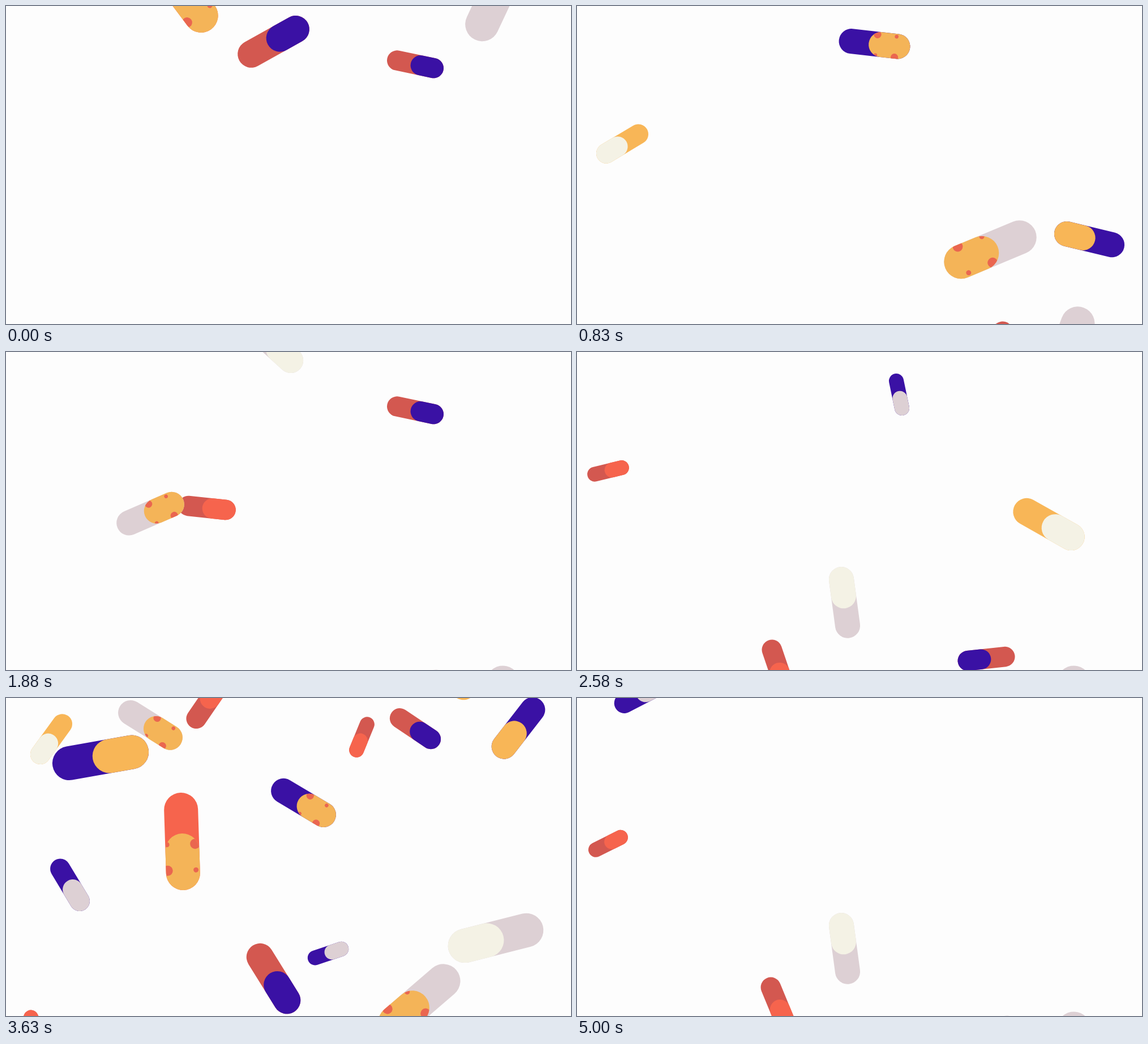
Animation, 998 px wide and 561 px high, one loop 5.04 s. Source, as an HTML page with a canvas:

```html
<!DOCTYPE html>
<html>
<head>
<meta charset="utf-8">
<title>Falling capsules</title>
<style>
html, body { margin: 0; width: 100%; height: 100%; overflow: hidden; background: #fdfdfd; }
canvas { display: block; }
</style>
</head>
<body>
<canvas id="stage" width="998" height="561"></canvas>
<script>
const ctx = document.getElementById('stage').getContext('2d');
const LOOP = 5040, STEP = 1000 / 12;
const TOP = -110, REST = 638, UNIT = 172;
const SMALL = 0.735, RUSH = 1.25;

const color = {
  red: '#d35850', blue: '#3a11a4', gold: '#f8b657', coral: '#f6644d',
  cream: '#f4f2e5', lavender: '#ddd0d4', spotted: '#f4b458', spot: '#ea6650'
};

// Heavier capsules are longer and fall faster (px per step)
const light = { length: 102, speed: 31.3 };
const medium = { length: 138, speed: 48.7 };
const heavy = { length: UNIT, speed: 50.5 };
const small = weight => ({ ...weight, length: weight.length * SMALL });
const rush = weight => ({ ...weight, speed: weight.speed * RUSH });

// Each falls from TOP to REST, turning between two angles; start and cycle count steps
const pill = (colors, weight, x, [from, to], start, cycle = Infinity) =>
  ({ colors: colors.split(' '), ...weight, x, from, to, start, cycle });

const pills = [
  pill('red coral', light, 355, [-83, 90], 9.7, 29.5),
  pill('red coral', small(light), 55, [74, -131], 20.78, 27.5),
  pill('red coral', small(light), 628.5, [79, 218], 37.28),
  pill('blue lavender', light, 113, [-54, 138], 28.95, 27.73),
  pill('blue lavender', small(light), 569, [126, -67], 25.09),
  pill('gold cream', small(medium), 80, [101, 203], 2.75, 36.5),
  pill('gold cream', medium, 833.5, [-68, 108], 22.5, 19.43),
  pill('red blue', small(medium), 723, [108, -230], -4.37, 22),
  pill('red blue', rush(medium), 472.5, [-64, 87], -2.84, 35.9),
  pill('blue gold', small(heavy), 905, [98, 235], -0.33, 40.1),
  pill('blue gold', rush(heavy), 167, [-36, 54], 39.59),
  pill('blue spotted', small(heavy), 525.5, [-30, 124], 6.5, 30.66),
  pill('coral spotted', rush(rush(heavy)), 311, [43, 136], -1.04, 39.44),
  pill('lavender cream', small(heavy), 472.5, [72, -158], 20.07, 29),
  pill('lavender cream', rush(heavy), 865, [322, 103], -1.45, 36),
  pill('lavender spotted', small(rush(heavy)), 255, [69, -106], 15.74, 24.76),
  pill('lavender spotted', rush(heavy), 730, [249, 122], 1.45, 31.32)
];

function capsule(left, right, fill) {
  ctx.beginPath();
  ctx.roundRect(left, -30, right - left, 60, 30);
  ctx.fillStyle = fill;
  ctx.fill();
}

// Two rows of spots, large and small in turn, cut off by the capsule's edge
function drawSpots() {
  ctx.clip();
  ctx.fillStyle = color.spot;
  for (const [row, along] of [5, 51].entries()) {
    for (const side of [0, 1]) {
      ctx.beginPath();
      ctx.arc(along, side ? 27 : -23, row === side ? 9 : 4.5, 0, Math.PI * 2);
      ctx.fill();
    }
  }
}

function drawPill(p, step) {
  if (step < p.start) return;
  const fallen = p.speed * ((step - p.start) % p.cycle);
  const part = Math.min(1, fallen / (REST - TOP));
  const [back, front] = p.colors;
  const scale = p.length / UNIT;
  ctx.save();
  ctx.translate(p.x, TOP + part * (REST - TOP));
  ctx.rotate((p.from + part * (p.to - p.from)) * Math.PI / 180);
  ctx.scale(scale, scale);
  capsule(-86, 86, color[back]);
  capsule(-14, 86, color[front]);
  if (front === 'spotted') drawSpots();
  ctx.restore();
}

const begin = performance.now();

function draw() {
  const time = (performance.now() - begin) % LOOP;
  // The motion advances twelve times a second; 4 ms allows for rounded frame times
  const step = Math.floor((time + 4) / STEP);
  ctx.clearRect(0, 0, 998, 561);
  for (const p of pills) drawPill(p, step);
  requestAnimationFrame(draw);
}
draw();
</script>
</body>
</html>
```
